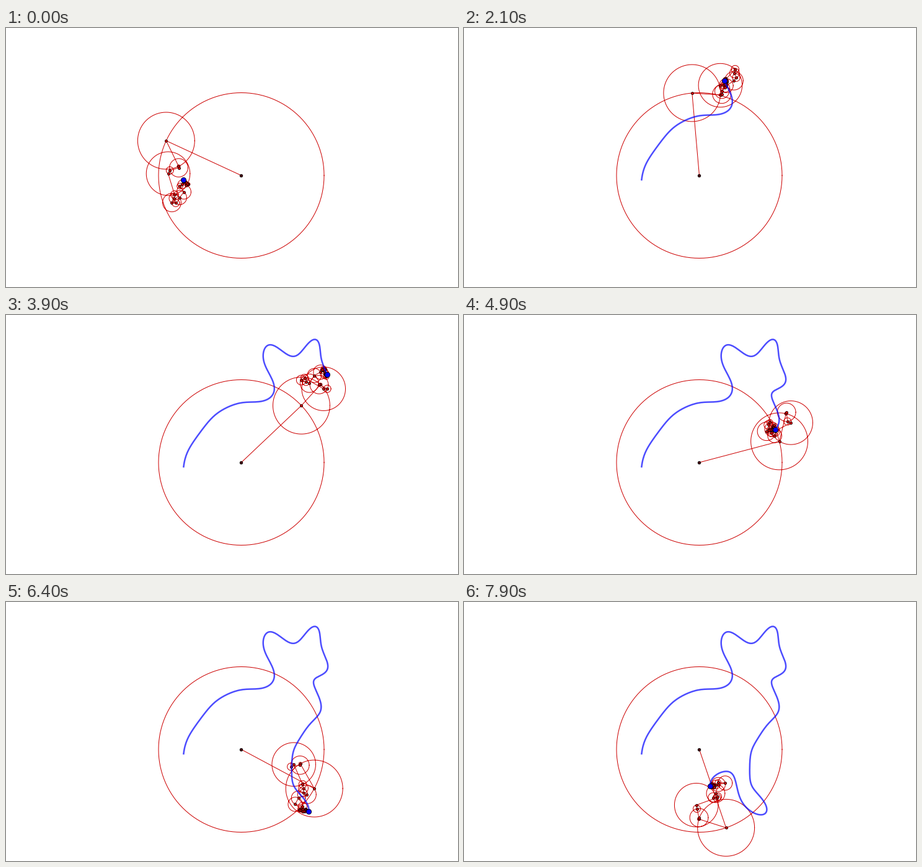
These frames come from a looping animation (729x418 px, 8000 ms). A matplotlib script:

```python
import numpy as np
import matplotlib.pyplot as plt
from matplotlib.animation import FuncAnimation

W, H, DPI = 729, 418, 64
PX = 72 / DPI
FRAMES, INTERVAL = 80, 100
STEP = 0.05                      # radians per frame
CENTER = 379 - 237.5j            # complex plane, y up
RED, BLUE = (0.8, 0, 0), (0, 0, 1)
TOP = 22                         # highest frequency

# Frequency: radius and phase in degrees, in drawing order
ARMS = {
    -1: (134, 155.2), 1: (46, -63.7), -4: (2.5, -76), -2: (15, 197.2),
    -7: (6, 241), 2: (35, -72.8), 6: (7.5, -127), -6: (6, -36),
    -5: (5, 183), -3: (14.5, 31.5), 3: (11.5, 50), 5: (11, 125),
}
LOOSE = (6, -6, -5)

# Cat outline, and when the pen reaches some of its points
CAT = [
    (285.5, 244), (293, 218), (315, 185), (347, 154.5), (385.5, 142),
    (418, 137.5), (427, 134.5), (431, 126), (425, 95), (417, 56),
    (419, 48.5), (425, 46), (433, 49), (444, 59), (457, 66), (464, 65),
    (475, 60.5), (493, 41.5), (498, 37), (503, 41), (508, 73), (516.5, 94),
    (518, 105), (516.5, 114), (511, 117.7), (501, 118.5), (497.5, 123),
    (505, 155), (500.5, 184), (484, 204), (466, 232), (460.5, 260),
    (466, 303), (483, 321), (488.5, 338), (484, 343), (473, 341),
    (445, 314), (440, 302), (434, 277), (423, 272), (411, 275.5),
    (396.5, 296),
]
REACHED = {0: 0, 4: 13, 15: 29, 21: 39, 28: 49, 34: 64, 42: 79}


def outline():
    """Times and points, with even speed between the timed points."""
    z = np.array([complex(x, -y) for x, y in CAT])
    s = np.concatenate([[0], np.cumsum(abs(np.diff(z)))])
    return np.interp(s, s[list(REACHED)], list(REACHED.values())), z


def fit(freqs):
    """Smooth Fourier fit of the outline, guided by the main arms."""
    n, z = outline()
    weight, goal = [], []
    for k in freqs:
        if k in ARMS:
            r, phase = ARMS[k]
            weight.append(1.5 if k in LOOSE else 5)
            goal.append(r * np.exp(1j * np.radians(phase)))
        else:
            weight.append(0.006 * (4 + k * k))
            goal.append(0)
    weight, goal = np.array(weight), np.array(goal)
    rows = np.vstack([np.exp(1j * STEP * np.outer(n, freqs)),
                      np.diag(weight)])
    rhs = np.concatenate([z - CENTER, weight * goal])
    return np.linalg.lstsq(rows, rhs, rcond=None)[0]


order = list(ARMS) + [4]
order += [s * k for k in range(7, TOP + 1) for s in (-1, 1)
          if s * k not in order]
freqs = np.array(order)
coefs = fit(order)
radii = abs(coefs)
unit = np.exp(1j * np.linspace(0, 2 * np.pi, 121))


def joints(n):
    arms = coefs * np.exp(1j * STEP * n * freqs)
    return CENTER + np.concatenate([[0], np.cumsum(arms)])


def put(line, z):
    line.set_data(z.real, -z.imag)


fig = plt.figure(figsize=(W / DPI, H / DPI), dpi=DPI, facecolor="white")
ax = fig.add_axes([0, 0, 1, 1])
ax.set_xlim(-0.5, W - 0.5)
ax.set_ylim(H - 0.5, -0.5)
ax.axis("off")

rings, = ax.plot([], [], color=RED, lw=PX, zorder=1)
rods, = ax.plot([], [], color=RED, lw=PX, zorder=2)
dots, = ax.plot([], [], "o", color=RED, ms=4.2 * PX, mec="black",
                mew=0.7 * PX, zorder=3)
hub, = ax.plot([], [], "o", color="#480812", ms=4.6 * PX, mec="black",
               mew=0.8 * PX, zorder=4)
trail, = ax.plot([], [], color=BLUE, alpha=0.7, lw=2.5 * PX, zorder=5,
                 solid_capstyle="projecting", solid_joinstyle="round")
pen, = ax.plot([], [], "o", color=BLUE, ms=8.2 * PX, mec="black",
               mew=0.8 * PX, zorder=6)
artists = [rings, rods, dots, hub, trail, pen]


def draw(n):
    z = joints(n)
    loops = z[:-1, None] + radii[:, None] * unit
    gap = np.full((len(radii), 1), complex(np.nan, np.nan))
    put(rings, np.hstack([loops, gap]).ravel())
    put(rods, z)
    put(dots, z[1:-1])
    put(hub, z[:1])
    put(pen, z[-1:])
    t = np.linspace(0, n, 4 * n + 1)
    put(trail, CENTER + np.exp(1j * STEP * np.outer(t, freqs)) @ coefs)
    return artists


def reset():
    return draw(0)


anim = FuncAnimation(fig, draw, frames=FRAMES, init_func=reset,
                     interval=INTERVAL, repeat=True, repeat_delay=0)
plt.show()
```
